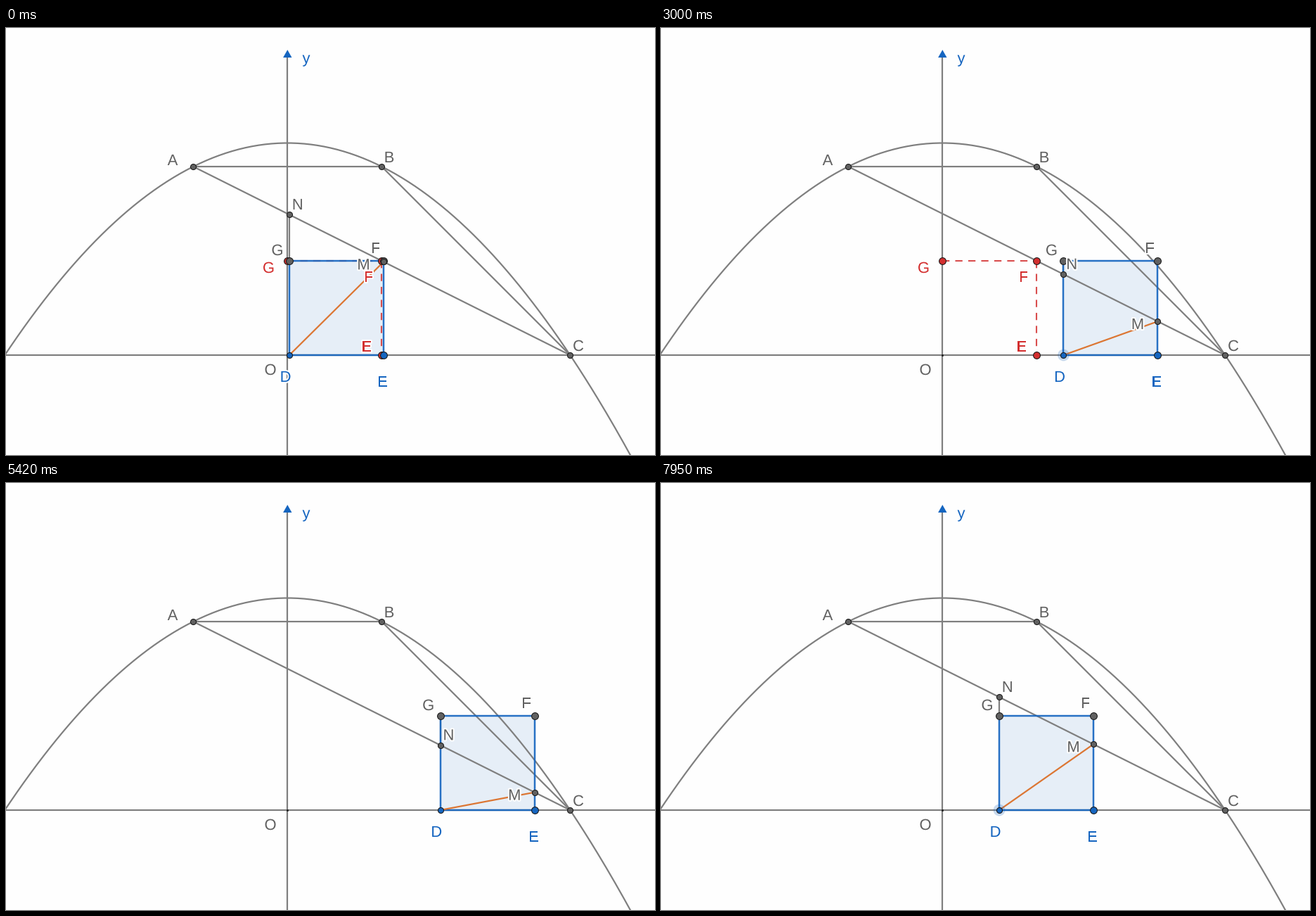
These frames come from a looping animation (923x607 px, 8 s). A matplotlib script:

```python
import numpy as np
import matplotlib.pyplot as plt
from matplotlib.animation import FuncAnimation
from matplotlib.patches import Circle, Polygon
from matplotlib.patheffects import withStroke

W, H, DPI = 923, 607, 100
STEP, LOOP = 40, 8000
PX = 72 / DPI

GREY, BLUE, RED, ORANGE = "#616161", "#1565c0", "#d32f2f", "#dc7633"
LINE = "#7f7f7f"
UNIT, OX, OY = 67, 400.3, 465
TOP = OY - 2 * UNIT
START = 403

# drag strokes: first update, last update, number of updates, end position
STROKES = [
    (840, 1080, 3, 455.5), (1190, 1190, 1, 458), (1330, 2040, 7, 499.5),
    (2170, 2170, 1, 506), (2280, 2870, 6, 564), (3000, 3720, 7, 623.2),
    (3830, 4200, 4, 663.5), (4450, 4450, 1, 653), (4560, 4560, 1, 642),
    (4690, 5040, 4, 617.7), (6030, 6270, 3, 584), (6380, 6750, 4, 564),
    (6860, 7580, 7, 503.7), (7710, 7950, 3, 481),
]

times, places = [0], [START]
for t0, t1, n, end in STROKES:
    begin = places[-1]
    times += list(np.linspace(t0, t1, n))
    places += [begin + (end - begin) * (i + 1) / n for i in range(n)]


def drag_x(t):
    return places[np.searchsorted(times, t + 1, side="right") - 1]


def to_px(x, y):
    return OX + UNIT * x, OY - UNIT * y


def line_ac(px):
    """Pixel height of line AC, y = 2 - (x - 2) / 2, at a pixel column."""
    return OY - UNIT * (2 - ((px - OX) / UNIT - 2) / 2)


fig = plt.figure(figsize=(W / DPI, H / DPI), dpi=DPI, facecolor="#fefefe")
ax = fig.add_axes([0, 0, 1, 1])
ax.set_xlim(0, W)
ax.set_ylim(H, 0)
ax.axis("off")


def stroke(xs, ys, color=LINE, width=2.2, z=2, **kw):
    return ax.plot(xs, ys, color=color, lw=width * PX, zorder=z,
                   solid_capstyle="butt", **kw)[0]


def dot(x, y, color=GREY, r=4, z=5):
    return ax.plot([x], [y], "o", ms=2 * r * PX, mfc=color, mec="#1c1c1c",
                   mew=1.1 * PX, zorder=z)[0]


def label(x, y, text, color=GREY, z=8):
    """Place a capital letter centred on (x, y)."""
    return ax.text(x, y + 8, text, color=color, fontsize=22 * PX, ha="center",
                   va="baseline", family="Liberation Sans", zorder=z,
                   path_effects=[withStroke(linewidth=4 * PX, foreground="white")])


# axes and curve
stroke([0, W], [OY, OY])
stroke([OX, OX], [H, 38])
ax.add_patch(Polygon([(OX, 31), (OX - 6.2, 42), (OX + 6.2, 42)], fc=BLUE, lw=0, zorder=3))
u = np.linspace(-6.2, 7.6, 300)
stroke(*to_px(u, 4.5 - u ** 2 / 8))

# triangle ABC
A, B, C = to_px(-2, 4), to_px(2, 4), to_px(6, 0)
for p, q in ((A, B), (B, C), (A, C)):
    stroke([p[0], q[0]], [p[1], q[1]])
for p in (A, B, C):
    dot(*p)
ax.plot([OX], [OY], "o", ms=3 * PX, color="#202020", mew=0, zorder=4)
for x, y, s in ((237, 187, "A"), (545, 183, "B"), (814, 451, "C"), (376, 485, "O")):
    label(x, y, s)
label(427, 42, "y", BLUE)

# red dashed resting place of the square
RX = OX + 2 * UNIT
dash = dict(dashes=(4.9, 3.9), alpha=0.85)
red = [
    stroke([OX, RX], [TOP, TOP], RED, 2.1, 2.5, **dash),
    stroke([RX, RX], [TOP, OY], RED, 2.1, 2.5, **dash),
    dot(OX, TOP, RED, 4.9), dot(RX, TOP, RED, 4.9), dot(RX, OY, RED, 4.9),
    label(373.5, 340, "G", RED, 7), label(515.5, 353, "F", RED, 7),
    label(513, 452, "E", RED, 7),
]

# moving square
fill = ax.add_patch(Polygon(np.zeros((4, 2)), fc=BLUE, alpha=0.1, lw=0, zorder=1))
edge = ax.add_patch(Polygon(np.zeros((4, 2)), fc="none", ec=BLUE, lw=2.5 * PX,
                            alpha=0.92, zorder=3))
seg_ng = stroke([], [], z=2.6)
seg_dm = stroke([], [], ORANGE, z=3.2)
halo = ax.add_patch(Circle((START, OY), 8.4, fc=BLUE, alpha=0.23, lw=0, zorder=4))

dots = {k: dot(0, 0, c, r, 6) for k, c, r in (
    ("G", GREY, 4.9), ("F", GREY, 4.9), ("N", GREY, 4), ("M", GREY, 4),
    ("D", BLUE, 4), ("E", BLUE, 4.9))}
names = {k: label(0, 0, k, BLUE if k in "DE" else GREY) for k in dots}
OFFSET = {"G": (-17, -16), "F": (-11.5, -19), "N": (11.7, -15.3),
          "M": (-28.5, 3), "D": (-5.5, 30), "E": (-1.5, 37)}


def update(i):
    t = i * STEP + STEP - 10
    x = drag_x(t)
    right = x + 2 * UNIT
    pts = {"D": (x, OY), "E": (right, OY), "F": (right, TOP), "G": (x, TOP),
           "N": (x, line_ac(x)), "M": (right, line_ac(right))}

    corners = [pts[k] for k in "DEFG"]
    fill.set_xy(corners)
    edge.set_xy(corners)
    seg_ng.set_data([x, x], [pts["N"][1], TOP])
    seg_dm.set_data([x, right], [OY, pts["M"][1]])
    for k, (px, py) in pts.items():
        dots[k].set_data([px], [py])
        dx, dy = OFFSET[k]
        names[k].set_position((px + dx, py + dy + 8))

    halo.center = (x, OY)
    halo.set_visible(590 <= t < 5290 or t >= 5790)
    for artist in red:
        artist.set_visible(t < 5420)
    return []


anim = FuncAnimation(fig, update, frames=LOOP // STEP, interval=STEP,
                     repeat=True, repeat_delay=0, blit=False)
plt.show()
```
